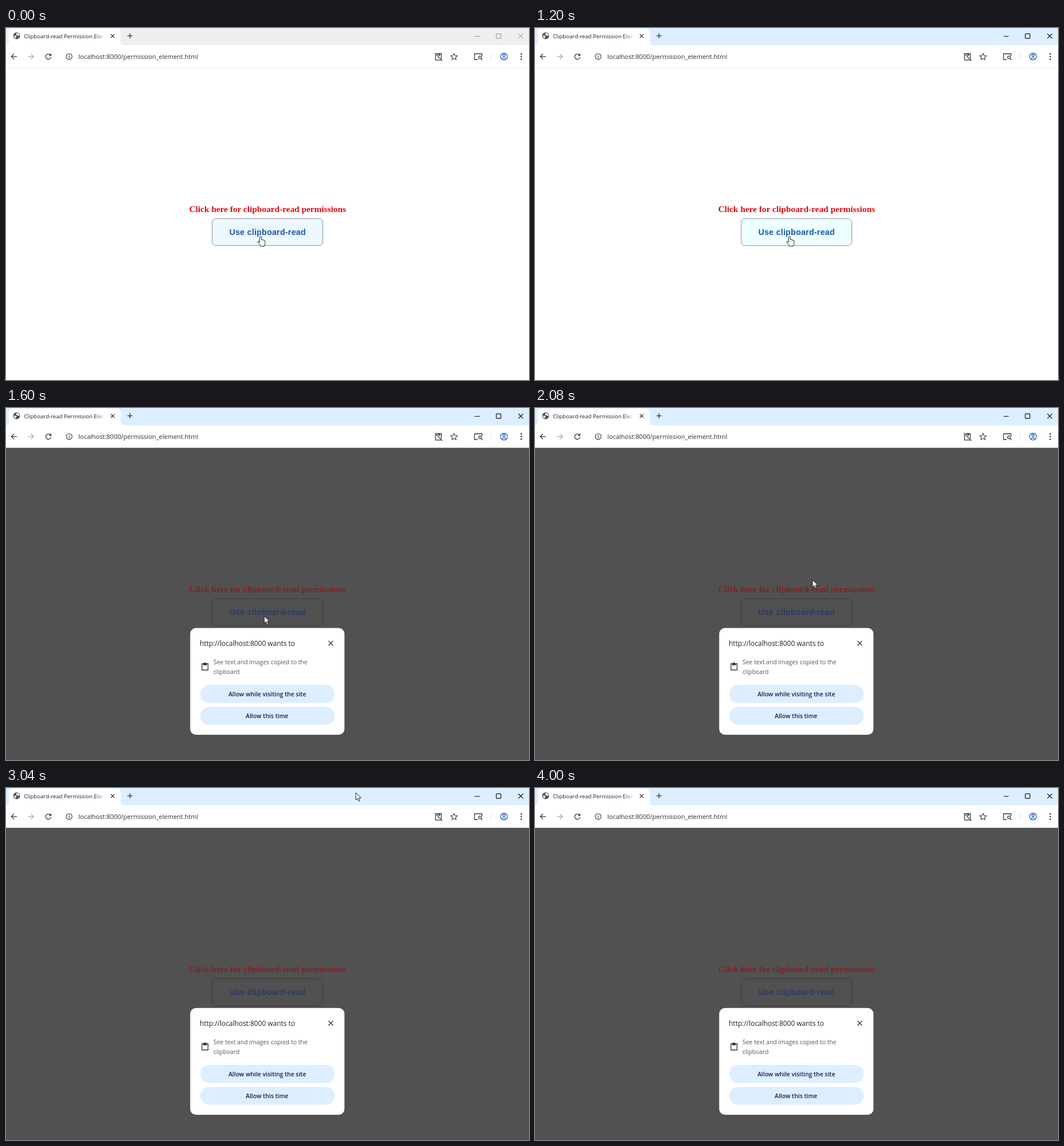
Write an HTML page that moves like this. It is 912 by 614 pixels and loops after 4.08 s.

```html
<!DOCTYPE html>
<html lang="en">
<head>
<meta charset="utf-8">
<title>Clipboard-read Permission Element</title>
<style>
  html, body { margin: 0; width: 100%; height: 100%; overflow: hidden; background: #fff; }
  svg { display: block; width: 100vw; height: 100vh; }
  text { font-family: "Open Sans", "Noto Sans", sans-serif; fill: #1f1f1f; }
  .line { fill: none; stroke: #33363a; stroke-width: 1.3; }
  #bar { fill: #efeff0; }
  #win { stroke: #858585; stroke-width: 1; fill: none; }
  #page { fill: #fff; }
  #head { font: bold 15.35px "Liberation Serif", "Times New Roman", serif; fill: #de0712; }
  #btn rect { fill: #edf7ff; stroke: #8290a6; }
  #btn text { font: bold 14.2px "Liberation Sans", Arial, sans-serif; letter-spacing: .28px; fill: #1759ae; }
  .active #bar { fill: #ddeeff; }
  .active #win { stroke: #111; stroke-width: 1.2; }
  .pressed #btn rect { fill: #edfffe; stroke: #8a9a9c; }
  .dim #page { fill: #515151; }
  .dim #head { fill: #7e2226; }
  .dim #btn rect { fill: #515151; stroke: #3b3b3b; }
  .dim #btn text { fill: #2b3b66; }
  .dim #shadow { display: none; }
  #pop .note { font-size: 10.43px; fill: #55585d; }
  #pop .pill { fill: #ddeeff; }
  #pop .act { font-size: 10.4px; font-weight: 600; fill: #0a2250; text-anchor: middle; }
  #arrow path, #hand { fill: #fff; stroke: #1c1c1c; stroke-width: 1; stroke-linejoin: round; }
  .pressed:not(.dim) #arrow path { stroke: #666; }
</style>
</head>
<body>
<svg id="stage" viewBox="0 0 912 614" preserveAspectRatio="none">
  <defs>
    <linearGradient id="fade">
      <stop offset="0" stop-color="#fff" stop-opacity="0"/>
      <stop offset="1" stop-color="#fff"/>
    </linearGradient>
    <filter id="blur" x="-10%" y="-10%" width="120%" height="120%">
      <feGaussianBlur stdDeviation="1.5"/>
    </filter>
    <clipPath id="tabClip"><rect x="30" y="4" width="141" height="22"/></clipPath>
  </defs>

  <rect id="bar" width="912" height="31"/>
  <path fill="#fff" d="M0 30q5 0 5-6V8q0-7 7-7h181q7 0 7 7v16q0 6 6 6z"/>
  <rect y="30" width="912" height="40" fill="#fff"/>

  <!-- tab -->
  <circle cx="18.5" cy="13.6" r="5.9" fill="#484b50"/>
  <path fill="#fff" d="M13.9 13.2l3.4.3 1.4 1.8-1.6 1.2v1.7q-3.2-1.4-3.2-5zM18.6 9l2.5.2q2 1.2 2.3 4.2l-2.1.6-1.4-1.5-2-.2-.6-1.3z"/>
  <text x="31.5" y="17.6" font-size="9.65" clip-path="url(#tabClip)">Clipboard-read Permission Element</text>
  <rect x="156" y="5" width="16" height="20" fill="url(#fade)"/>
  <path class="line" d="M182.8 10.6l6.4 6.4m0-6.4l-6.4 6.4M211.7 13.6h9m-4.5-4.5v9"/>

  <g id="win">
    <path d="M817 14.5h9M893.4 10l8.4 8.4m0-8.4l-8.4 8.4"/>
    <rect x="855" y="10.2" width="8" height="8" rx="1"/>
  </g>

  <!-- toolbar -->
  <g class="line">
    <path d="M19 49.8H9.3m4.6-4.6l-4.6 4.6 4.6 4.6"/>
    <path stroke="#a9abae" d="M38.3 49.8H48m-4.6-4.6l4.6 4.6-4.6 4.6"/>
    <path d="M77.6 47.2a4.6 4.6 0 1 0 .8 3.6M78.4 44.8v3.4h-3.4"/>
    <circle cx="110.2" cy="49.8" r="5.1" stroke-width="1.1"/>
    <path d="M110.2 49v3.6M110.2 46.7v1.3"/>
    <path d="M750.5 44.6h8.7v8.6M749 46.2v9.7h9.7M747.8 43.6l13 13.4M752.3 45.3h4.2v2.2h-3"/>
    <path stroke-width="1.1" d="M781.3 44.3l1.7 3.8 4.1.4-3.1 2.7.9 4-3.6-2.1-3.6 2.1.9-4-3.1-2.7 4.1-.4z"/>
    <path d="M822.5 55h-5.5v-10h13v4"/>
    <circle cx="826.6" cy="51.3" r="2.4"/>
    <path d="M828.4 53.1l2.6 2.7"/>
    <path stroke="#e1e5ea" stroke-width="1" d="M846 43.5v13"/>
    <g stroke="#1f5bb5">
      <circle cx="868.4" cy="49.8" r="6"/>
      <circle cx="868.4" cy="48" r="2"/>
      <path d="M864.3 54q4.1-3.2 8.2 0"/>
    </g>
  </g>
  <g fill="#33363a">
    <circle cx="898.5" cy="45.2" r="1.3"/><circle cx="898.5" cy="49.8" r="1.3"/><circle cx="898.5" cy="54.4" r="1.3"/>
  </g>
  <text x="126.3" y="53.8" font-size="11" style="fill:#2c2e31">localhost:8000/permission_element.html</text>
  <rect y="69" width="912" height="1" fill="#e5e7ea"/>

  <!-- page -->
  <rect id="page" y="69.5" width="912" height="544.5"/>
  <text id="head" x="456.2" y="321" text-anchor="middle">Click here for clipboard-read permissions</text>
  <g id="btn">
    <rect x="359.5" y="332.5" width="193" height="47" rx="6.5"/>
    <text x="456.2" y="360.8" text-anchor="middle">Use clipboard-read</text>
  </g>

  <g id="pop">
    <rect id="shadow" x="320.3" y="384.3" width="271" height="187.5" rx="11" fill="#8d98b4" opacity=".75" filter="url(#blur)"/>
    <rect x="321.2" y="383.8" width="269" height="186.2" rx="10" fill="#fff"/>
    <text x="338" y="414.8" font-size="11.92">http://localhost:8000 wants to</text>
    <path class="line" d="M562.3 406.2l8 8m0-8l-8 8"/>
    <path class="line" stroke-width="1.4" d="M341.7 446h10.6v11h-10.6z"/>
    <path fill="#33363a" d="M343.8 445.4h1.6q.3-1.8 1.6-1.8t1.6 1.8h1.6v3.3h-6.4z"/>
    <text class="note" x="361.8" y="447.3">See text and images copied to the</text>
    <text class="note" x="361.8" y="464.2">clipboard</text>
    <rect class="pill" x="338.8" y="483" width="234.5" height="31.6" rx="15.8"/>
    <rect class="pill" x="338.8" y="521.2" width="234.5" height="31.6" rx="15.8"/>
    <text class="act" x="455.7" y="502.6">Allow while visiting the site</text>
    <text class="act" x="455.2" y="541.2">Allow this time</text>
  </g>

  <path id="hand" d="M442.4 374V365.2q-.1-1.6 1.3-1.6t1.7 1.6l.4 4q1.3-.6 2.1.5 1.3-.4 2 .8 1.7-.2 1.9 1.6v3.5q0 2.2-1.3 3.8v1.2h-6.4l-.4-1.3q-2.6-2.3-4.6-5.7-.4-1.5 1-1.7 1.1.2 2.3 2.1z"/>
  <g id="arrow"><path d="M0 0v12.6l2.9-2.7 2.1 4.6 2.2-1-2.1-4.5h4z"/></g>
</svg>
<script>
  const LOOP = 4080, STEP = 80;
  const ACTIVE = 1120, PRESS = 1200, POPUP = 1440, DIM = 1600, GONE = 3520;

  // time, x, y of the arrow tip
  const path = [
    [1440, 443.8, 363], [1520, 444, 363], [1600, 450.3, 363], [1760, 450.3, 363],
    [2080, 484, 300], [2400, 566, 140], [2640, 604.8, 60.5], [2880, 609, 30],
    [3200, 611, -13.5], [4080, 611, -13.5]
  ];

  const $ = id => document.getElementById(id);
  const stage = $('stage'), pop = $('pop'), hand = $('hand'), arrow = $('arrow');
  const show = (el, on) => el.style.display = on ? '' : 'none';

  function tip(t) {
    const i = Math.max(1, path.findIndex(p => p[0] >= t));
    const [a, b] = [path[i - 1], path[i]];
    const k = Math.max(0, (t - a[0]) / (b[0] - a[0]));
    return [a[1] + (b[1] - a[1]) * k, a[2] + (b[2] - a[2]) * k];
  }

  function draw(t) {
    stage.classList.toggle('active', t >= ACTIVE);
    stage.classList.toggle('pressed', t >= PRESS);
    stage.classList.toggle('dim', t >= DIM);
    show(pop, t >= POPUP);
    show(hand, t < POPUP);
    show(arrow, t >= POPUP && t < GONE);
    arrow.setAttribute('transform', `translate(${tip(t)})`);
  }

  function tick() {
    const t = performance.now() % LOOP;
    draw(Math.floor(t / STEP) * STEP);
    requestAnimationFrame(tick);
  }
  tick();
</script>
</body>
</html>
```
